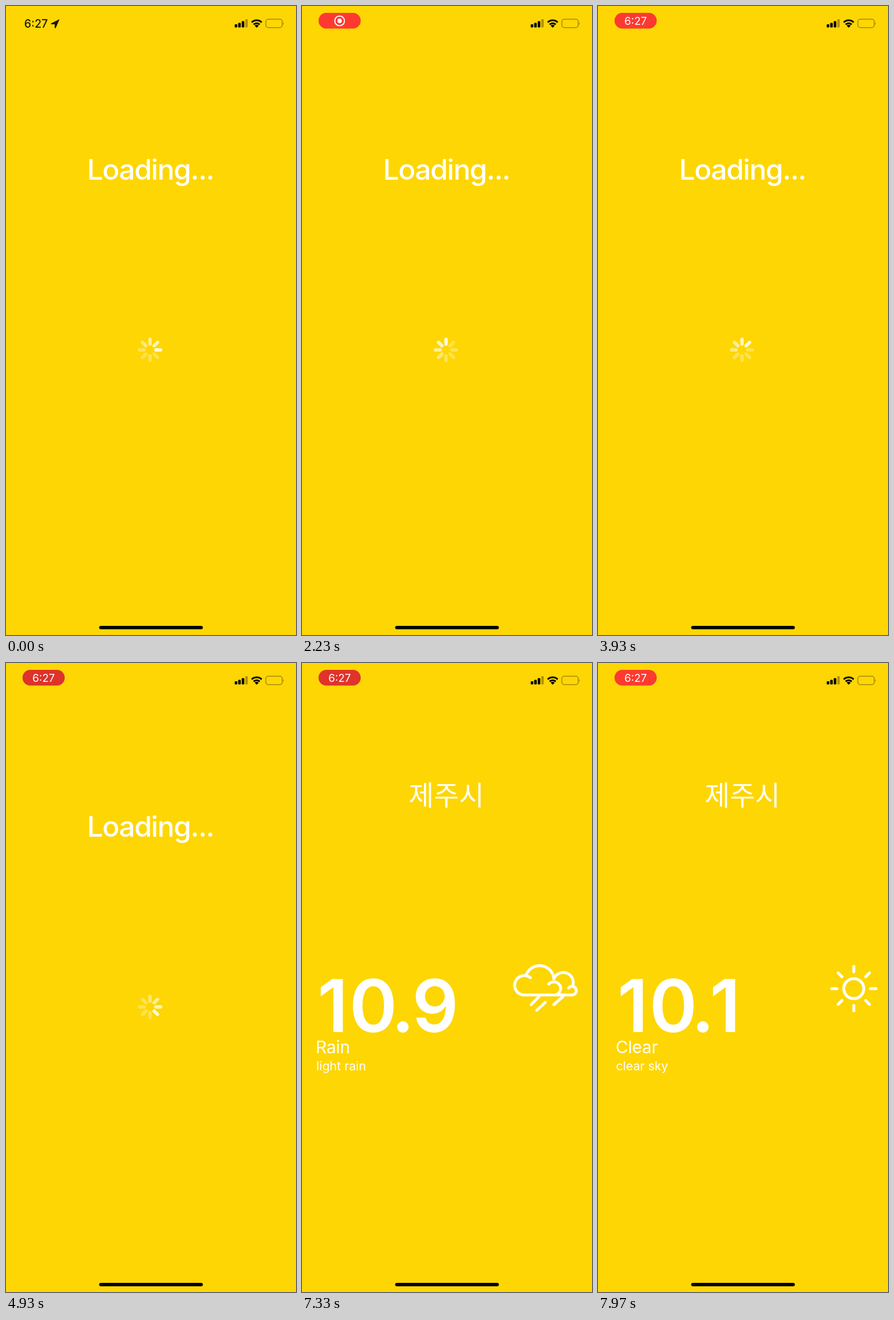
Recreate the animation shown at these times as an HTML page. Size 509 by 1101 pixels, loop 8 s.

```html
<!DOCTYPE html>
<html lang="ko">
<head>
<meta charset="utf-8">
<title>Weather</title>
<style>
  html, body { margin: 0; width: 100%; height: 100%; overflow: hidden; background: #fed603; }
  svg { display: block; width: 509px; height: 1101px; font-family: Inter, sans-serif; }
  .mid { text-anchor: middle; }
  .line { fill: none; stroke: #fff; stroke-width: 5; stroke-linecap: round; }
  .title { font-size: 50px; font-weight: 500; letter-spacing: -1.5px; }
  .city { font: 500 48px "Noto Sans CJK KR", "Noto Sans CJK", sans-serif; }
  .temp { font-size: 127.5px; font-weight: 600; text-anchor: middle; }
  .main { font-size: 30px; letter-spacing: -.2px; }
  .detail { font-size: 21.5px; }
</style>
</head>
<body>
<svg viewBox="0 0 509 1101" fill="#fff">
  <g id="clock" fill="#1c1800">
    <text x="32" y="38" font-size="19.5" font-weight="500">6:27</text>
    <path d="M94 23L79 30.5Q78 32 80 32H85.500V38Q86 40 87.500 38Z"/>
  </g>
  <g id="pill">
    <rect id="pillBack" x="29" y="12" width="74" height="27.500" rx="13.500"/>
    <g id="record">
      <circle cx="66" cy="26" r="8.500" fill="none" stroke="#fff" stroke-width="2"/>
      <circle cx="66" cy="26" r="3.900"/>
    </g>
    <text id="pillTime" class="mid" x="66" y="33" font-size="19">6:27</text>
  </g>

  <g fill="#000">
    <rect x="401.500" y="32" width="4.500" height="5.500" rx="1"/>
    <rect x="407.500" y="29.500" width="4.500" height="8" rx="1"/>
    <rect x="413.700" y="26.500" width="4.500" height="11" rx="1"/>
    <rect x="419.800" y="23" width="4.500" height="14.500" rx="1" opacity=".3"/>
    <path d="M431.300 28.600A12.300 12.300 0 0 1 448.700 28.600M434.700 32.400A7.500 7.500 0 0 1 445.300 32.400"
          fill="none" stroke="#000" stroke-width="3"/>
    <path d="M440 38L436.500 34.500A5 5 0 0 1 443.500 34.500Z"/>
    <g opacity=".42">
      <rect x="456.200" y="23.200" width="28.600" height="14.600" rx="4" fill="none" stroke="#000" stroke-width="1.300"/>
      <path d="M486.500 28Q488.500 30.500 486.500 33Z"/>
    </g>
    <rect x="163.500" y="1085" width="182" height="6" rx="3"/>
  </g>

  <text id="loading" class="mid title" x="253.500" y="303.500">Loading...</text>
  <text id="city" class="mid city" x="253.500">제주시</text>
  <g id="spinner" class="line" style="stroke-width:6" transform="translate(252.800 602)"></g>

  <g id="pages">
    <g>
      <text class="temp" x="54 125 177 234" y="646">10.9</text>
      <text class="main" x="24" y="683">Rain</text>
      <text class="detail" x="25" y="713">light rain</text>
      <path class="line" d="M401 551A17 17 0 1 0 388 581H474A7.500 7.500 0 1 0 468 569
        M394 545A25 25 0 0 1 442 553M433 562A12 11.500 0 1 1 444 581M442 553A17.500 17.500 0 0 1 475 566
        M416 584L402 598M427 594L412 608M458 584L442 598"/>
    </g>
    <g transform="translate(509)">
      <text class="temp" x="54 125 177 216" y="646">10.1</text>
      <text class="main" x="24" y="683">Clear</text>
      <text class="detail" x="24.500" y="713">clear sky</text>
      <g id="sun" class="line" transform="translate(442 570)"><circle r="17.500"/></g>
    </g>
  </g>
</svg>
<script>
const LOOP = 8000, PILL_IN = 300, PILL_TIME = 3100, CITY_IN = 5300, WEATHER_IN = 6400, SWIPE = 7400;
const $ = id => document.getElementById(id);
const clamp = v => Math.min(1, Math.max(0, v));
const show = (id, opacity) => $(id).setAttribute('opacity', +opacity);

// Eight spokes around the centre, clockwise from the right.
function spokes(id, from, to) {
  return Array.from({ length: 8 }, (_, i) => {
    const path = document.createElementNS('http://www.w3.org/2000/svg', 'path');
    path.setAttribute('d', `M${from} 0H${to}`);
    path.setAttribute('transform', `rotate(${i * 45})`);
    return $(id).appendChild(path);
  });
}
const blades = spokes('spinner', 10.3, 18.5);
spokes('sun', 29.5, 39);

function draw(t) {
  const grow = clamp((t - PILL_IN) / 250);
  show('clock', 1 - grow);
  show('pill', grow);
  $('pill').setAttribute('transform', `translate(66 26) scale(${0.7 + 0.3 * grow}) translate(-66 -26)`);
  const dark = 0.5 + 0.5 * Math.cos((t - 1105) / 1000 * Math.PI);
  const shade = 1 - 0.14 * dark;
  $('pillBack').setAttribute('fill', `rgb(${255 * shade}, ${58 * shade}, ${48 * shade})`);
  const swap = clamp((t - PILL_TIME) / 200);
  show('record', 1 - swap);
  show('pillTime', swap);

  const ready = t >= WEATHER_IN;
  show('loading', t < CITY_IN);
  show('city', t >= CITY_IN);
  $('city').setAttribute('y', ready ? 249 : 304);

  show('spinner', !ready);
  const head = Math.floor(t / 100 + 0.45);
  blades.forEach((blade, i) => {
    const age = (head - i + 8) % 8;
    blade.setAttribute('opacity', Math.max(0.3, 0.85 - 0.13 * age));
  });

  // Page swipe settles like a critically damped spring.
  show('pages', ready);
  const u = Math.max(0, t - SWIPE) / 91;
  $('pages').setAttribute('transform', `translate(${-509 * (1 - (1 + u) * Math.exp(-u))})`);
}

const start = performance.now();
function frame() {
  draw((performance.now() - start) % LOOP);
  requestAnimationFrame(frame);
}
frame();
</script>
</body>
</html>
```
